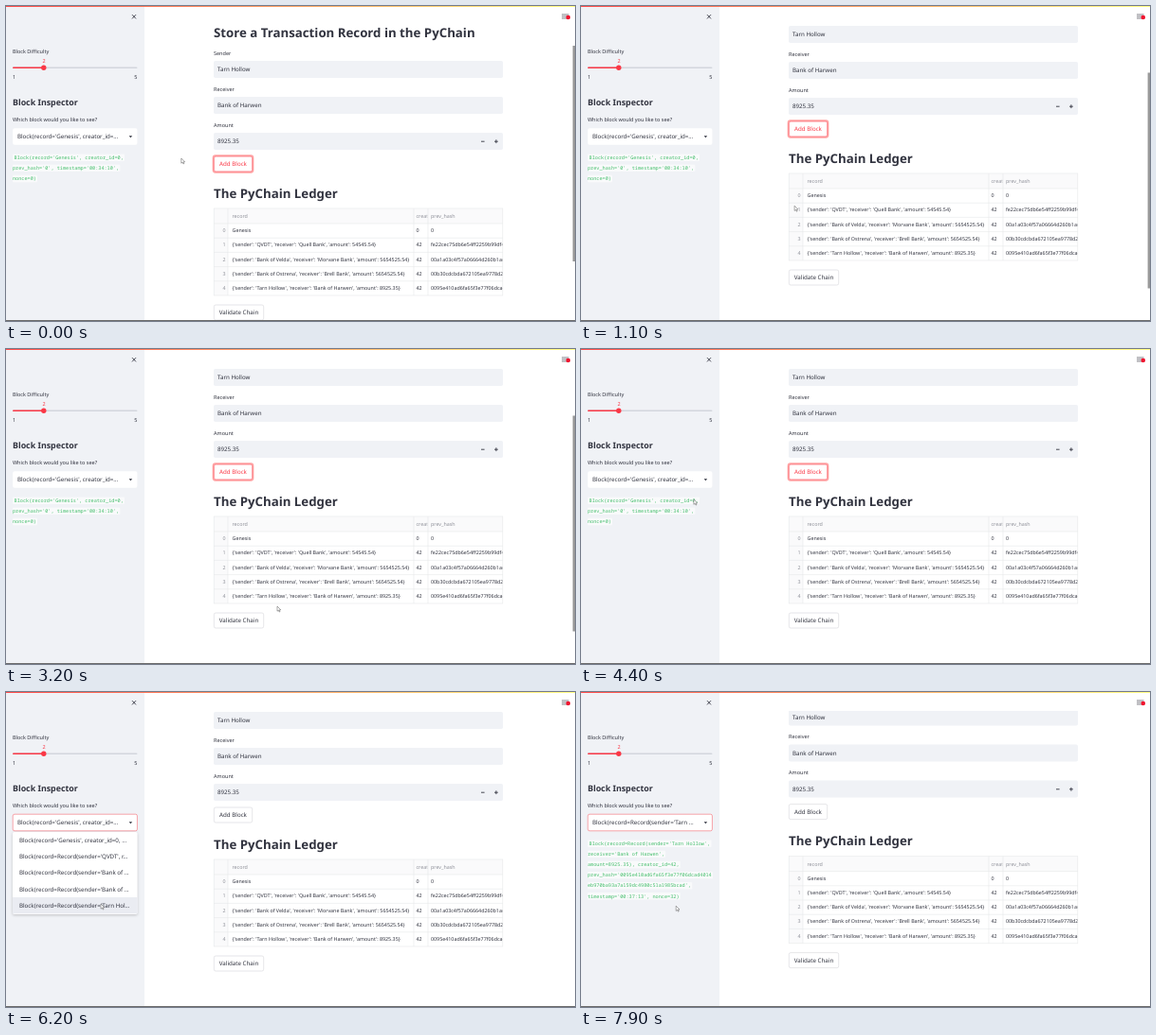
An HTML page for the animation above (8000 ms loop, 600 px wide and 333 px high).

```html
<!DOCTYPE html>
<html lang="en">
<head>
<meta charset="utf-8">
<title>PyChain Ledger</title>
<style>
  html, body { margin: 0; width: 100%; height: 100%; overflow: hidden; background: #fff; }
  svg { display: block; }
  text { font-family: "Noto Sans", "Open Sans", sans-serif; text-rendering: geometricPrecision; }
  .mono { font-family: "Noto Sans Mono", "Liberation Mono", monospace; }
  .shadow { filter: drop-shadow(0 1px 1.5px rgba(0, 0, 0, .2)); }
</style>
</head>
<body>
<svg id="stage" width="600" height="333" viewBox="0 0 600 333"></svg>
<script>
const LOOP = 8000, STEP = 100, SIDE = 146;
const INK = '#31333f', RED = '#fa3846', GREEN = '#41bd69', PANEL = '#f0f2f6', LINE = '#e6e7ea', FAINT = '#8f919a';
const BODY = 6.2, SMALL = 5.5, CELL = 5.35, CODE = 5.2, TITLE = 13.25;

// Text is placed by the middle of its capitals.
const text = (x, y, str, size = BODY, fill = INK, extra = '') =>
  `<text x="${x}" y="${(y + size * .357).toFixed(2)}" font-size="${size}" fill="${fill}" ${extra}>${str}</text>`;
const box = (x, y, w, h, fill, extra = '') =>
  `<rect x="${x}" y="${y}" width="${w}" height="${h}" fill="${fill}" ${extra}/>`;
const line = (x1, y1, x2, y2, stroke = LINE, width = .6) =>
  `<path d="M${x1} ${y1}L${x2} ${y2}" stroke="${stroke}" stroke-width="${width}"/>`;
const group = (id, inner, extra = '') => `<g id="${id}" ${extra}>${inner}</g>`;
const heading = (x, y, str, size) => text(x, y, str, size, INK, 'font-weight="600"');

const records = [
  ['QVDT', 'Quell Bank', '54545.54', 'fe22cec75db6e54ff2259b99df4c1'],
  ['Bank of Velda', 'Morvane Bank', '5654525.54', '00a1a03c4f57a06664d260b1ac27e'],
  ['Bank of Ostrena', 'Brell Bank', '5654525.54', '00b30cdcbda672105ea9778d2f60b'],
  ['Tarn Hollow', 'Bank of Harwen', '8925.35', '0095e410ad6fa65f3e77f06dcad40']
];
const [sender, receiver, amount] = records[3];
const hash = ['0095e410ad6fa65f3e77f06dcad4014', 'eb970ba93a7a159dc4980c51a1985bcad'];

function field(y, label, value) {
  return text(219, y - 17.3, label, SMALL) + box(219, y - 9, 305, 18, PANEL, 'rx="1.8"') + text(223, y, value);
}

function button(y, w, label, color, border) {
  return box(219.3, y - 8, w, 16, '#fff', `rx="1.8" stroke="${border}" stroke-width=".6"`) +
    text(219.3 + w / 2, y, label, BODY, color, 'text-anchor="middle"');
}

function table() {
  const top = 214, head = 16, rowH = 15.2, bottom = top + head + rowH * 5;
  const cells = [['Genesis', '0', '0']].concat(records.map(([s, r, a, h]) =>
    [`{'sender': '${s}', 'receiver': '${r}', 'amount': ${a}}`, '42', h]));
  let out = box(219, top, 305, head, '#fafafb') + box(219, top, 15, bottom - top, '#fafafb');
  out += text(238.5, 222, 'record', CELL, FAINT) + text(448, 222, 'prev_hash', CELL, FAINT);
  out += `<svg x="430" y="${top}" width="14.5" height="${head}">${text(2.5, 8, 'creator_id', CELL, FAINT)}</svg>`;
  cells.forEach(([rec, id, prev], i) => {
    const y = top + head + rowH * (i + .48);
    out += text(231.5, y, i, CELL, FAINT, 'text-anchor="end"') +
      text(238.5, y, rec, CELL) + text(432.5, y, id, CELL) +
      `<svg x="445" y="${y - 6}" width="79" height="12">${text(3, 6, prev, CELL)}</svg>` +
      line(219, top + head + rowH * i, 524, top + head + rowH * i);
  });
  [219.3, 234, 430, 445, 523.7].forEach(x => out += line(x, top, x, bottom));
  return out + line(219, top, 524, top) + line(219, bottom, 524, bottom);
}

function page() {
  return heading(219, 28.2, 'Store a Transaction Record in the PyChain', TITLE) +
    field(67, 'Sender', sender) + field(105, 'Receiver', receiver) + field(143, 'Amount', amount) +
    line(501, 143.2, 504.6, 143.2, INK, .9) + line(515, 143.2, 518.8, 143.2, INK, .9) +
    line(516.9, 141.3, 516.9, 145.1, INK, .9) +
    group('addIdle', button(167, 40.4, 'Add Block', INK, '#d5d6da')) +
    group('addFocus', box(218.4, 158.1, 42.2, 17.8, 'none', 'rx="2.4" stroke="#ffa5a5" stroke-width="1.5"') +
      button(167, 40.4, 'Add Block', RED, RED)) +
    heading(219, 198, 'The PyChain Ledger', TITLE) + table() +
    button(324, 52.4, 'Validate Chain', INK, '#d5d6da');
}

function codeBlock(lines) {
  return lines.map((str, i) => {
    const x = i ? 7 : 8.6, y = 160.2 + i * 11.1, w = str.length * CODE * .6;
    return box(7, y - 3.6, w + x - 6, 7.4, '#f9fafb', 'rx="1"') + text(x, y, str, CODE, GREEN, 'class="mono"');
  }).join('');
}

function sidebar() {
  return box(0, 0, SIDE, 333, PANEL) +
    line(133, 9.2, 137, 13.4, INK, .9) + line(137, 9.2, 133, 13.4, INK, .9) +
    text(7, 47.7, 'Block Difficulty', SMALL) + text(40, 58, '2', SMALL, RED, 'text-anchor="middle"') +
    box(7, 64.4, 131.5, 1.6, '#d3d6dd', 'rx=".8"') + box(7, 64.4, 33, 1.6, RED, 'rx=".8"') +
    `<circle cx="39.8" cy="65.2" r="2.7" fill="${RED}"/>` +
    text(7, 75.3, '1', SMALL) + text(138.5, 75.3, '5', SMALL, INK, 'text-anchor="end"') +
    heading(7, 102, 'Block Inspector', 8.85) + text(7, 120, 'Which block would you like to see?', SMALL) +
    box(7.2, 129.2, 131.2, 17.6, '#fff', 'rx="1.8" id="select"') +
    group('pickOld', text(12, 138, "Block(record='Genesis', creator_id=…")) +
    group('pickNew', text(12, 138, `Block(record=Record(sender='${sender.slice(0, 4)} …`)) +
    `<path d="M129.6 137.2h3.6l-1.8 2z" fill="${INK}"/>` +
    group('codeOld', codeBlock(["Block(record='Genesis', creator_id=0,",
      "prev_hash='0', timestamp='00:34:10',", 'nonce=0)'])) +
    group('codeNew', codeBlock([`Block(record=Record(sender='${sender}',`, `receiver='${receiver}',`,
      `amount=${amount}), creator_id=42,`, `prev_hash='${hash[0]}`, `${hash[1]}',`, "timestamp='00:37:13', nonce=32)"]));
}

function menu() {
  const items = ["Block(record='Genesis', creator_id=0, …"].concat(
    records.map(([s], i) => `Block(record=Record(sender='${['QVDT\', r', 'Bank of ', 'Bank of ', s.slice(0, 8)][i]}…`));
  return box(7, 148, 131.6, 87, '#fff', 'rx="1.8" class="shadow"') +
    box(7, 0, 131.6, 17.3, '#eaecf2', 'id="hover"') +
    items.map((str, i) => text(14, 156.4 + i * 17.3, str)).join('');
}

function tooltip() {
  const lines = [`Block(record=Record(sender='${sender}', receiver='${receiver}', amount=${amount}), creator_id=42,`,
    `prev_hash='${hash.join('')}',`, "timestamp='00:37:13', nonce=32)"];
  return box(9, 197.4, 291.5, 34.8, '#eff0f2', 'stroke="#c6c7cc" stroke-width=".6" class="shadow"') +
    lines.map((str, i) => text(15, 205.4 + i * 9.7, str, CELL, '#5b5c63')).join('');
}

const $ = id => document.getElementById(id);
$('stage').innerHTML =
  '<defs><linearGradient id="bar"><stop stop-color="#ff4b4b"/><stop offset="1" stop-color="#fffd80"/></linearGradient></defs>' +
  box(0, 0, 600, 333, '#fff') + group('page', page()) + box(SIDE, 0, 454, 20, '#fff') +
  box(597.6, 42, 2.4, 228, '#9a9a9a', 'id="thumb"') + sidebar() +
  [9, 11, 13].map(y => line(586, y, 593.5, y, '#74757d', .9)).join('') +
  '<circle cx="592.8" cy="12" r="2.3" fill="#f0142f"/>' +
  group('menu', menu()) + group('tip', tooltip()) +
  box(0, 0, 600, 1, 'url(#bar)') + box(0, 332, 600, 1, '#6b6b6b') +
  group('cursor', '<path d="M0 0V5.2L1.3 4.1L2.2 6L3 5.6L2.2 3.8H3.8Z" fill="#fff" stroke="#555" stroke-width=".5"/>');

const path = [
  [0, 184.8, 161], [300, 184.8, 161], [700, 164, 172], [900, 190, 190], [1000, 212, 205], [1400, 296, 245],
  [1700, 245, 240], [1800, 212, 234], [2000, 132, 219.8], [2200, 150, 228], [2700, 248, 282], [3200, 286, 272],
  [3500, 206, 282], [3700, 228, 290], [4200, 150, 205], [4500, 108, 143], [4700, 108, 139], [5000, 106, 165],
  [5500, 100.2, 205], [6100, 100, 224], [7300, 100, 225], [7900, 100.2, 226.2], [8000, 100.2, 226.2]
];
const scroll = [[0, 0], [100, 26], [200, 37], [7600, 40.4]];
const hover = [[0, 0], [4900, 1], [5300, 2], [5600, 3], [6100, 4]];

const held = (steps, t) => steps.filter(s => s[0] <= t).pop()[1];

function follow(t) {
  const i = path.findIndex(p => p[0] > t), [t0, x0, y0] = path[i - 1], [t1, x1, y1] = path[i];
  const k = (t - t0) / (t1 - t0), e = k * k * (3 - 2 * k);
  return [x0 + (x1 - x0) * e, y0 + (y1 - y0) * e];
}

const show = (id, on) => $(id).setAttribute('display', on ? 'inline' : 'none');

function draw(t) {
  const focus = t >= 4600, picked = t >= 7500, updated = t >= 7600, y = held(scroll, t), pointer = follow(t);
  $('page').setAttribute('transform', `translate(0 ${-y})`);
  $('thumb').setAttribute('y', 42 + y * .77);
  $('cursor').setAttribute('transform', `translate(${pointer})`);
  $('hover').setAttribute('y', 147.8 + held(hover, t) * 17.3);
  $('select').setAttribute('stroke', focus ? '#f77f86' : 'none');
  $('select').setAttribute('stroke-width', .7);
  // The scrollbar only shows while the pointer is over the main column.
  show('thumb', pointer[0] > SIDE);
  show('addFocus', !focus);
  show('addIdle', focus);
  show('menu', t >= 4700 && !picked);
  show('tip', t >= 6700 && !picked);
  show('pickOld', !picked);
  show('pickNew', picked);
  show('codeOld', !updated);
  show('codeNew', updated);
}

const start = performance.now();
function tick() {
  const t = (performance.now() - start) % LOOP;
  draw(Math.floor(t / STEP) * STEP);
  requestAnimationFrame(tick);
}
tick();
</script>
</body>
</html>
```
